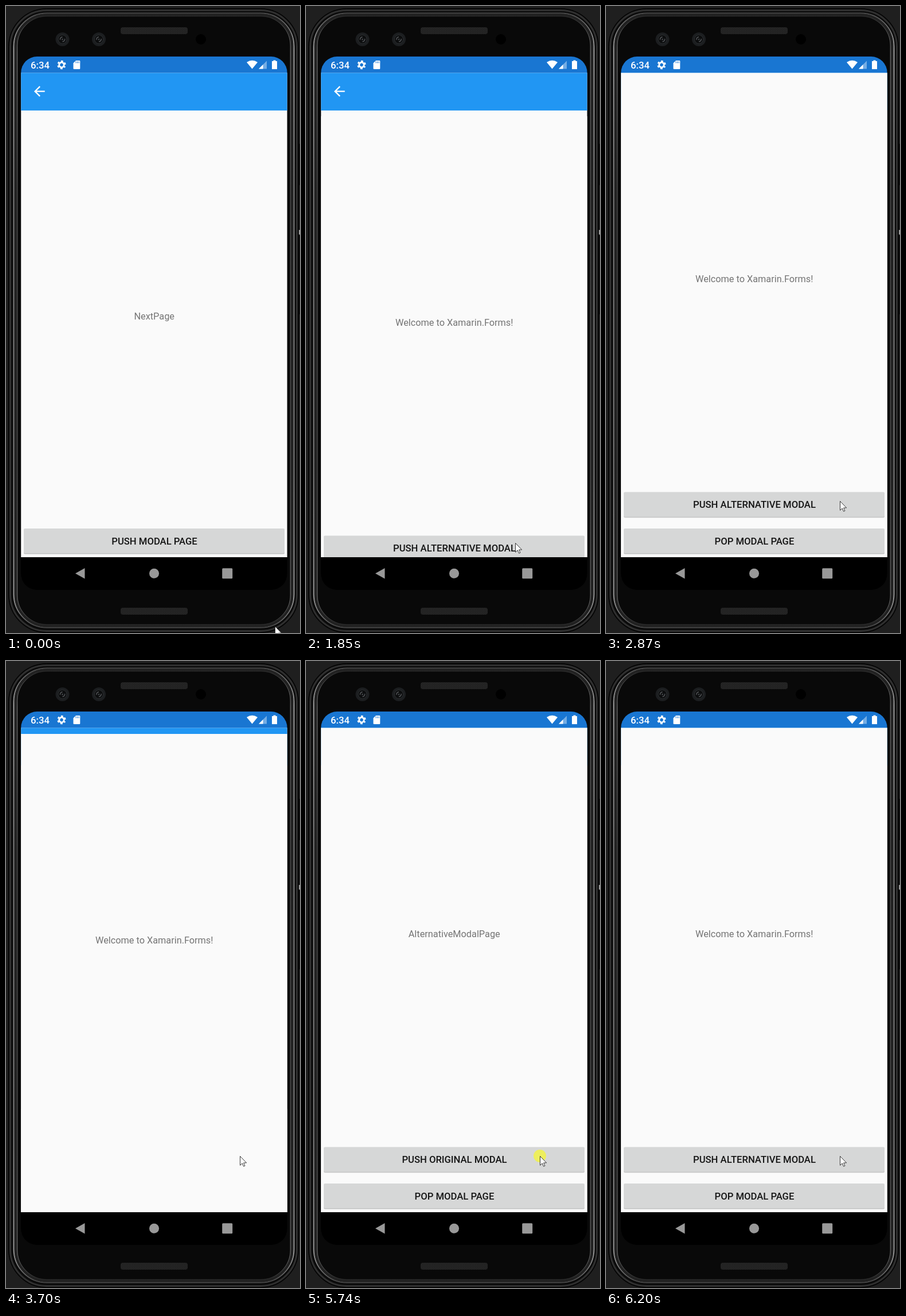
Write an HTML page that moves like this. It is 513x1092 px and loops after 8 s.

```html
<!DOCTYPE html>
<html lang="en">
<head>
<meta charset="utf-8">
<title>Modal pages</title>
<style>
html, body { margin: 0; width: 513px; height: 1092px; overflow: hidden; background: #1f1f1f; }
svg { display: block; }
text { font-family: Roboto, sans-serif; text-anchor: middle; }
.label { font-size: 16.3px; fill: #747474; }
.caption { font-size: 16.65px; font-weight: 500; fill: #151515; }
.clock { font-size: 16.8px; font-weight: 500; fill: #fff; text-anchor: start; }
</style>
</head>
<body>
<svg width="513" height="1092" viewBox="0 0 513 1092">
  <defs>
    <linearGradient id="rim" x2="0" y2="1">
      <stop offset="0" stop-color="#4a4a4a"/>
      <stop offset=".06" stop-color="#b0b0b0"/>
      <stop offset=".3" stop-color="#8a8a8a"/>
      <stop offset=".75" stop-color="#8c8c8c"/>
      <stop offset=".95" stop-color="#a5a5a5"/>
      <stop offset="1" stop-color="#4a4a4a"/>
    </linearGradient>
    <pattern id="mesh" width="3" height="3" patternUnits="userSpaceOnUse">
      <path d="M0 0h3v3h-3z" fill="#1b1b1b"/>
      <path d="M0 0h1.2v1.2h-1.2zM1.5 1.5h1.2v1.2h-1.2z" fill="#333"/>
    </pattern>
    <clipPath id="screen"><rect x="26.2" y="88" width="464.400" height="929" rx="28"/></clipPath>
    <clipPath id="content"><rect x="26" y="116.400" width="465" height="843.600"/></clipPath>
    <g id="lens">
      <circle r="12" fill="#1c1e20"/>
      <circle r="7.5" fill="#0c0d0e" stroke="#2c2f31"/>
      <path d="M-4 1A4 4 0 0 1 0-4M4-1A4 4 0 0 1 0 4" fill="none" stroke="#5a5d60" stroke-width="1.3"/>
      <circle r="1.6" fill="#3a3d40"/>
    </g>
  </defs>

  <!-- phone body -->
  <g fill="none">
    <rect x="4.5" y="4.500" width="506" height="1087" rx="66" fill="#0b0b0b" stroke="#000"/>
    <rect x="7.500" y="7.500" width="500" height="1081" rx="63" stroke="#303030" stroke-width="3"/>
    <rect x="13.500" y="12.500" width="489" height="1070" rx="58" stroke="url(#rim)" stroke-width="1.800"/>
    <rect x="16.500" y="15" width="483" height="1065" rx="55" stroke="#222" stroke-width="3"/>
    <rect x="19.500" y="17.500" width="477" height="1060" rx="52" fill="#090909" stroke="url(#rim)" stroke-opacity=".55" stroke-width="1.600"/>
    <path d="M511.500 240v72M511.500 400v137" stroke="#0a0a0a" stroke-width="2"/>
    <path d="M512 390v8" stroke="#999" stroke-width="2"/>
  </g>
  <rect x="200" y="37" width="117" height="12" rx="4" fill="url(#mesh)"/>
  <rect x="200" y="1048" width="117" height="12" rx="4" fill="url(#mesh)"/>
  <use href="#lens" x="98.500" y="58"/>
  <use href="#lens" x="162" y="58"/>
  <circle cx="340" cy="58" r="9" fill="#000"/>

  <g clip-path="url(#screen)">
    <path d="M26 88h465v929h-465z" fill="#000"/>
    <path d="M26 88h465v29h-465z" fill="#1976d2"/>
    <g id="pages" clip-path="url(#content)"></g>

    <!-- status bar -->
    <text class="clock" x="43" y="108.600">6:34</text>
    <g fill="none" stroke="#fff" transform="rotate(30 97 102.500)">
      <circle cx="97" cy="102.500" r="4.200" stroke-width="2.900"/>
      <circle cx="97" cy="102.500" r="6.400" stroke-width="2.600" stroke-dasharray="3.500 3.202" stroke-dashoffset="1.750"/>
    </g>
    <g fill="#fff">
      <path d="M122 95h6q1.300 0 1.300 1.300v12.400q0 1.300-1.300 1.300h-9.200q-1.300 0-1.300-1.300v-9.200z"/>
      <path d="M429.500 109.500L420 98Q429.500 91.500 439 98Z"/>
      <path d="M455 95.500v14h-14z" opacity=".4"/>
      <path d="M448.500 102v7.500h-7.500z"/>
      <path d="M466.500 94.500h4v1.500h2.500v14h-9v-14h2.500z"/>
    </g>
    <path d="M122 96.500v3M124.500 96.500v3M127 96.500v3" stroke="#1976d2"/>

    <!-- navigation bar -->
    <g fill="#999">
      <path d="M121 988.300L137.500 979V997.600Z"/>
      <circle cx="258.500" cy="988.300" r="8.500"/>
      <rect x="377.200" y="979.300" width="18" height="18" rx="1.500"/>
    </g>
  </g>

  <circle id="click" r="11" fill="#ff0" opacity=".57"/>
  <path id="cursor" d="M.5.5V16.300L4.200 12.900L6.600 18.200L8.900 17.200L6.600 12H11.600Z" fill="#fff" stroke="#222" stroke-width=".9"/>
</svg>
<script>
const $ = id => document.getElementById(id);
const LOOP = 8000, HEIGHT = 844, NEVER = 1e9;

const button = (y, caption) => `
  <rect x="31" y="${y + 1.5}" width="455" height="43.5" rx="2.500" fill="#000" opacity=".1"/>
  <rect x="31" y="${y + 1}" width="455" height="43.3" rx="2" fill="#000" opacity=".16"/>
  <rect x="31" y="${y}" width="455" height="43.3" rx="2" fill="#d6d7d7"/>
  <text class="caption" x="259" y="${y + 27.8}">${caption}</text>`;

const page = (label, y, buttons) => `<g>
  <path d="M26 116h465v844h-465z" fill="#fafafa"/>
  <text class="label" x="258.700" y="${y}">${label}</text>${buttons}</g>`;

const modal = (label, target) =>
  page(label, 480.5, button(846.4, `PUSH ${target} MODAL`) + button(910, "POP MODAL PAGE"));

const welcome = modal("Welcome to Xamarin.Forms!", "ALTERNATIVE");
$("pages").innerHTML = page("NextPage", 545.5, button(910, "PUSH MODAL PAGE")) + `
  <path d="M26 116h465v66h-465z" fill="#2196f3"/>
  <path transform="translate(44.3 134.6) scale(1.17)" fill="#fff"
    d="M20 11H7.830l5.590-5.590L12 4l-8 8 8 8 1.410-1.410L7.830 13H20z"/>` +
  welcome + modal("AlternativeModalPage", "ORIGINAL") + welcome;

// Each modal slides in while the one below it drops out.
const modals = [...$("pages").children].slice(-3);
const slides = [
  { enter: 1655, time: 280, leave: 3667 },
  { enter: 3667, time: 300, leave: 5887 },
  { enter: 5887, time: 300, leave: NEVER }
];
const clicks = [1470, 3520, 5740], CLICK_TIME = 130;

// time, x, y
const path = [
  [30, 469, 1080], [400, 341, 931], [600, 363, 936], [830, 363, 936],
  [880, 365, 935], [2440, 365, 935], [2870, 408, 862], [LOOP, 408, 862]
];

const progress = (t, start, time) => Math.min(1, Math.max(0, (t - start) / time));

function cursorAt(t) {
  const i = Math.max(1, path.findIndex(p => p[0] >= t));
  const [a, ax, ay] = path[i - 1], [b, bx, by] = path[i];
  const u = progress(t, a, b - a), e = u * u * (3 - 2 * u);
  return [ax + (bx - ax) * e, ay + (by - ay) * e].map(Math.round);
}

function draw(t) {
  modals.forEach((m, i) => {
    const { enter, time, leave } = slides[i];
    const y = HEIGHT * ((1 - progress(t, enter, time)) ** 2 + progress(t, leave, 300) ** 2);
    m.setAttribute("transform", `translate(0 ${Math.round(y)})`);
  });
  const at = `translate(${cursorAt(t)})`;
  $("cursor").setAttribute("transform", at);
  $("click").setAttribute("transform", at);
  $("click").style.display = clicks.some(c => t >= c && t < c + CLICK_TIME) ? "" : "none";
}

const start = performance.now();
function tick() {
  draw((performance.now() - start) % LOOP);
  requestAnimationFrame(tick);
}
tick();
</script>
</body>
</html>
```
